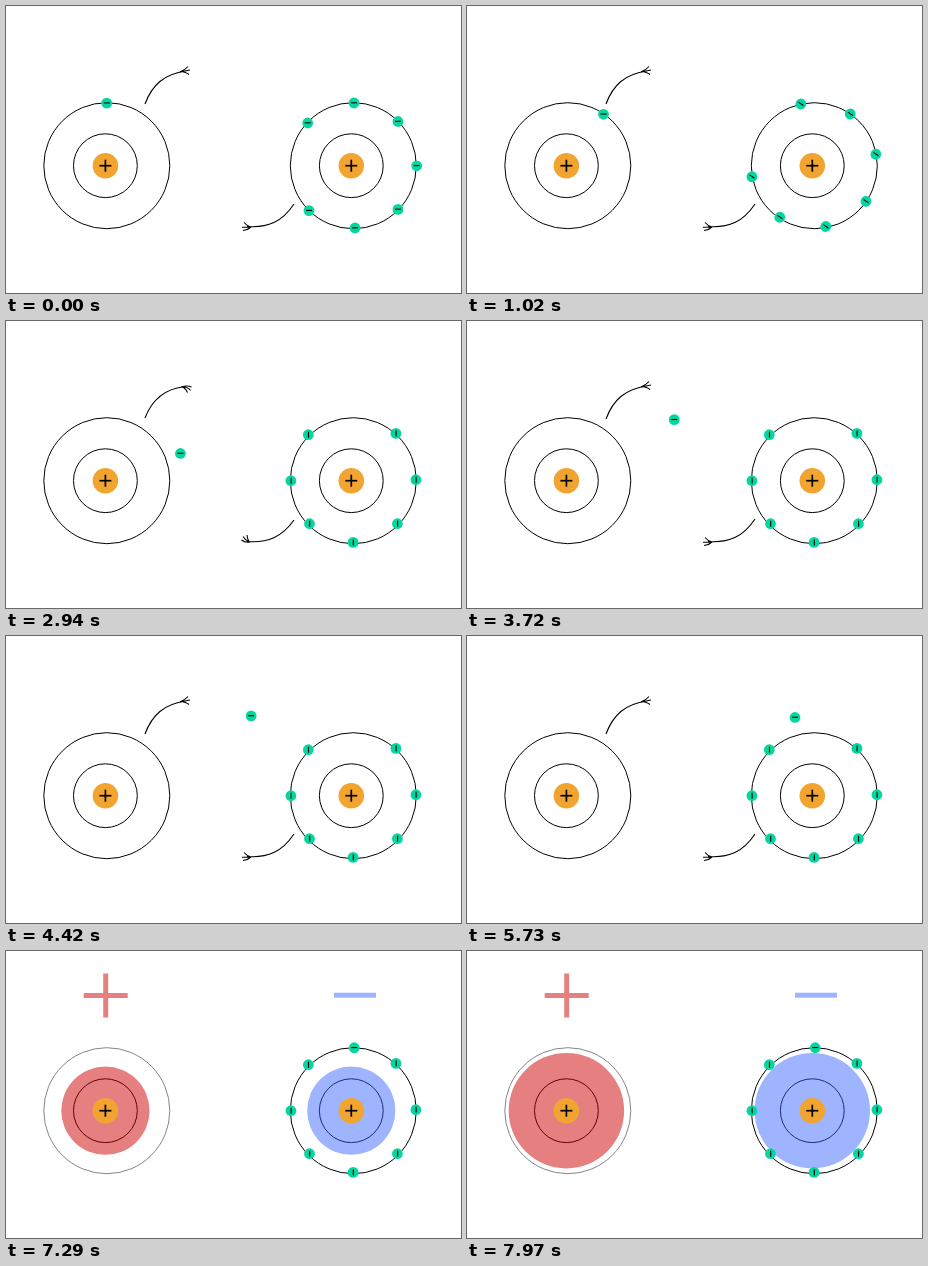
Animation of 455 by 287 pixels, one loop 8 s. Source, as an HTML page with a canvas:

```html
<!DOCTYPE html>
<html lang="en">
<head>
<meta charset="utf-8">
<title>Electron transfer</title>
<style>
  html, body { margin: 0; width: 100%; height: 100%; overflow: hidden; background: #fff; }
  canvas { display: block; }
</style>
</head>
<body>
<canvas id="stage" width="455" height="287"></canvas>
<script>
const ctx = document.getElementById('stage').getContext('2d');
const LOOP = 8000, ORBIT_START = 90, ORBIT_END = 2500, REVEAL = 5900, WIGGLE = 1000 / 6;
const GREEN = '#05d6a0', ORANGE = '#f2a431', RED = '#e68080', BLUE = '#9fb4ff';
const rad = deg => deg * Math.PI / 180;

const atoms = [
  { orbitX: 100.8, x: 99.4, glow: RED, inner: '#640000', outer: '#858585' },
  { orbitX: 347.3, x: 345.3, glow: BLUE, inner: '#1c2c80', outer: '#000' }
];
const CY = 159.7;

// Seven electrons turn as one group around this pivot
const pivot = [348.1, 158.8];
const group = [[301.7, 117], [348, 97], [392, 115.5], [410.7, 159.8],
               [392, 203.4], [349, 222], [303, 204.6]];

// Flight of the free electron: time, angle, radius around flightCentre
const flightCentre = [284.2, 206.3];
const flight = [[ORBIT_END, 201.1, 128.8], [2940, 213.9, 132.3], [4420, 252.8, 132.3],
                [5730, 289.3, 132.3], [6200, 300.3, 126.9]];

// Two hand-drawn poses for each arrow
const arrows = [
  ['M139 98C146 79 158 68 180 65M174 66Q179 64 182 60.5M174 66L184 64M174 65.5Q180 66 183 68.5',
   'M288 198C276 216 262 222 241 220.5M245 221Q241 220 238 216.5M245 221L236 221.3M245 221Q242 224 237 224.5'],
  ['M139 97C146 79 158 68 178 65.8M175 66Q181 64 185.5 66M177 66Q182 66 184.5 69.5M177 66Q180 68 181.5 71.5',
   'M288 199C276 216 262 222 241 220.5M244 221Q239 222 235.5 219M243 220.5Q239 219 237 215.5M243 220.5Q241 217 241 214']
].map(pose => pose.map(d => new Path2D(d)));

function disc(x, y, r, color) {
  ctx.beginPath();
  ctx.arc(x, y, r, 0, 2 * Math.PI);
  ctx.fillStyle = color;
  ctx.fill();
}

function ring(x, r, color) {
  ctx.beginPath();
  ctx.arc(x, CY, r, 0, 2 * Math.PI);
  ctx.lineWidth = 1;
  ctx.strokeStyle = color;
  ctx.stroke();
}

function sign(x, y, size, weight, color, plus) {
  ctx.fillStyle = color;
  ctx.fillRect(x - size / 2, y - weight / 2, size, weight);
  if (plus) ctx.fillRect(x - weight / 2, y - size / 2, weight, size);
}

function electron(x, y) {
  disc(x, y, 5.4, GREEN);
  sign(x, y - 0.2, 6, 1.1, '#000');
}

function freeElectron(t, turn) {
  if (t < ORBIT_END) {
    const a = rad(turn - 90);
    return electron(100.7 + 62.8 * Math.cos(a), CY + 62.6 * Math.sin(a));
  }
  const time = Math.min(t, flight[flight.length - 1][0]);
  const i = flight.findIndex(key => time <= key[0]) || 1;
  const from = flight[i - 1], to = flight[i];
  const p = (time - from[0]) / (to[0] - from[0]);
  const a = rad(from[1] + (to[1] - from[1]) * p);
  const r = from[2] + (to[2] - from[2]) * p;
  electron(flightCentre[0] + r * Math.cos(a), flightCentre[1] + r * Math.sin(a));
}

function draw(t) {
  const charged = t >= REVEAL;
  const glow = 36.3 + (t - 6900) * 0.02;
  const turn = 90 * Math.min(1, Math.max(0, (t - ORBIT_START) / (ORBIT_END - ORBIT_START)));

  ctx.fillStyle = '#fff';
  ctx.fillRect(0, 0, 455, 287);

  for (const atom of atoms) {
    ring(atom.orbitX, 63, charged ? atom.outer : '#000');
    if (charged) disc(atom.x, CY, glow, atom.glow);
    ring(atom.x, 31.9, charged && glow > 32 ? atom.inner : '#000');
    disc(atom.x, CY, 12.8, ORANGE);
    sign(atom.x, CY, 12, 1.7, '#000', true);
  }

  if (charged) {
    sign(99.7, 44.5, 44, 5, RED, true);
    sign(349, 44.2, 42, 5, BLUE);
  } else {
    ctx.lineWidth = 1.1;
    ctx.strokeStyle = '#000';
    arrows[Math.floor(t / WIGGLE) % 2].forEach(path => ctx.stroke(path));
  }

  ctx.save();
  ctx.translate(...pivot);
  ctx.rotate(rad(turn));
  for (const [x, y] of group) electron(x - pivot[0], y - pivot[1]);
  ctx.restore();
  freeElectron(t, turn);
}

const start = performance.now();
function tick() {
  draw((performance.now() - start) % LOOP);
  requestAnimationFrame(tick);
}
tick();
</script>
</body>
</html>
```
